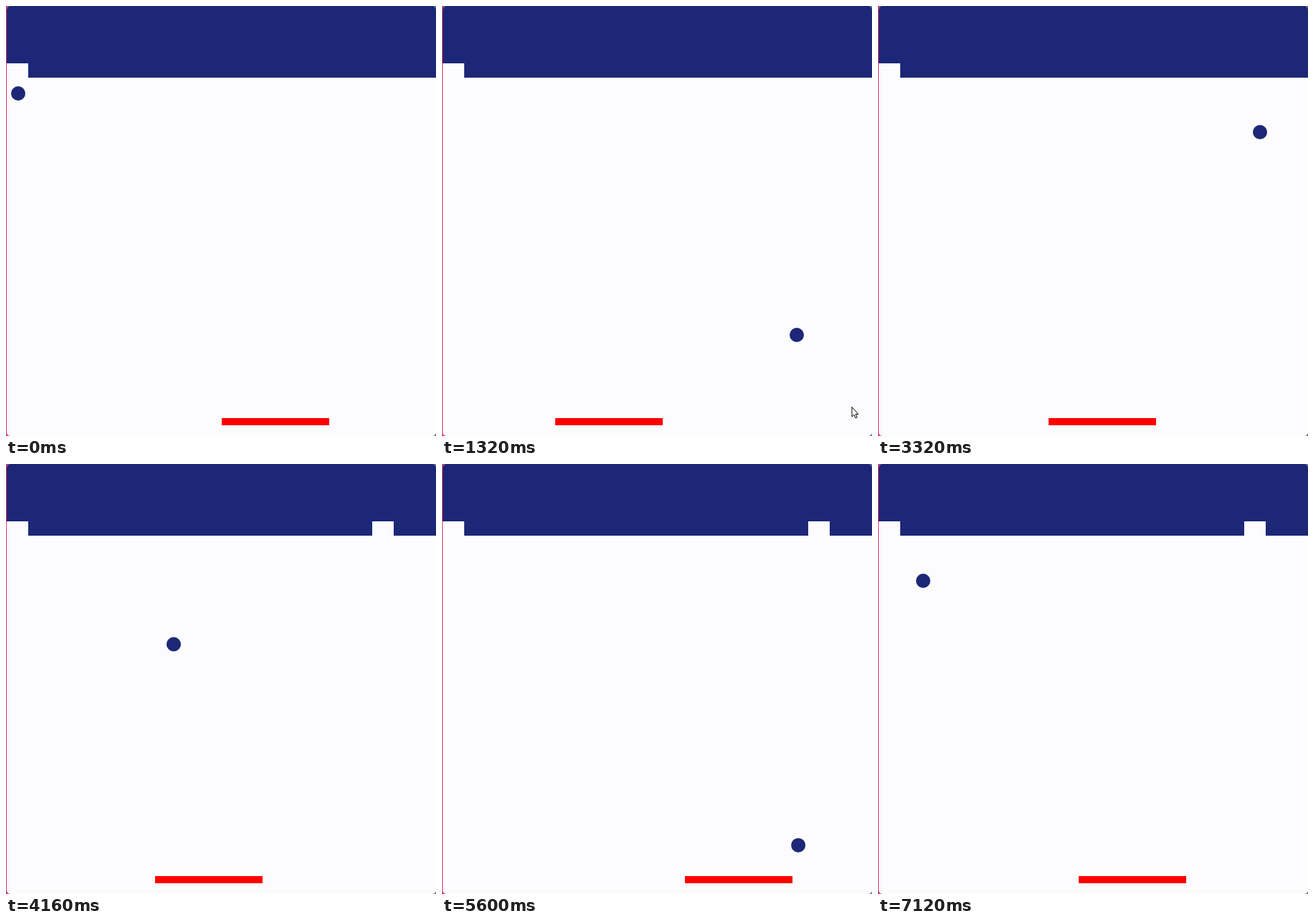
An HTML page that plays this animation: 600 by 600 pixels, repeating every 7.16 s.

```html
<!DOCTYPE html>
<html lang="en">
<head>
<meta charset="utf-8">
<title>Brick game</title>
<style>
  html, body { margin: 0; width: 100%; height: 100%; overflow: hidden; }
  body { background: linear-gradient(90deg, #dc3565 0 50%, #6b6d80 50%); }
  svg { display: block; width: 100vw; height: 100vh; }
</style>
</head>
<body>
<svg viewBox="0 0 600 600">
  <clipPath id="board"><rect x="1" width="599" height="600" rx="5"/></clipPath>
  <g clip-path="url(#board)">
    <rect width="600" height="600" fill="#fcfbfd"/>
    <path d="M0 0H600V100H31V80H0Z" fill="#1c2877"/>
    <rect id="gap" x="511" y="80" width="30" height="20" fill="#fcfbfd"/>
    <rect id="paddle" y="575" width="150" height="10" fill="#f00"/>
    <circle id="ball" r="10" fill="#1c2877"/>
  </g>
  <path id="cursor" d="M572 559.5V573.2l3-2.8 2.2 4.6 2-1-2.1-4.4h3.9Z" fill="#fff" stroke="#000"/>
</svg>
<script>
  const LOOP = 7160, STEP = 40;
  const LEFT = 7, RIGHT = 593, TOP = 109, BOTTOM = 571;
  const BALL = { x: 17, y: 122 };

  // Key points as [time, value]: height the ball has covered, and the paddle's left edge
  const pace = [[0, 0], [1320, 337], [2480, 631], [3320, 844], [5000, 1263], [6280, 1581], [7120, 1781]];
  const slide = [[0, 301], [1320, 158], [2480, 161], [3320, 238], [5000, 178], [6020, 451], [6480, 451], [7120, 280]];

  const [gap, paddle, ball, cursor] =
    ["gap", "paddle", "ball", "cursor"].map(id => document.getElementById(id));

  function at(keys, t) {
    const i = Math.max(1, keys.findIndex(k => k[0] >= t));
    const [t0, a] = keys[i - 1], [t1, b] = keys[i];
    return a + (b - a) * (t - t0) / (t1 - t0);
  }

  // Reflect a straight run between two walls
  function bounce(pos, min, max) {
    const size = max - min;
    return max - Math.abs((pos - min) % (2 * size) - size);
  }

  function show(el, on) {
    el.setAttribute("visibility", on ? "visible" : "hidden");
  }

  function draw(now) {
    const t = Math.floor(now % LOOP / STEP) * STEP;
    const run = at(pace, t);
    ball.setAttribute("cx", bounce(BALL.x + 2 * run, LEFT, RIGHT));
    ball.setAttribute("cy", bounce(BALL.y + run, TOP, BOTTOM));
    paddle.setAttribute("x", Math.round(at(slide, t)));
    show(gap, t >= 3600);
    show(cursor, t >= 720 && t < 3000);
  }

  const start = performance.now();
  function tick() {
    draw(performance.now() - start);
    requestAnimationFrame(tick);
  }
  tick();
</script>
</body>
</html>
```
